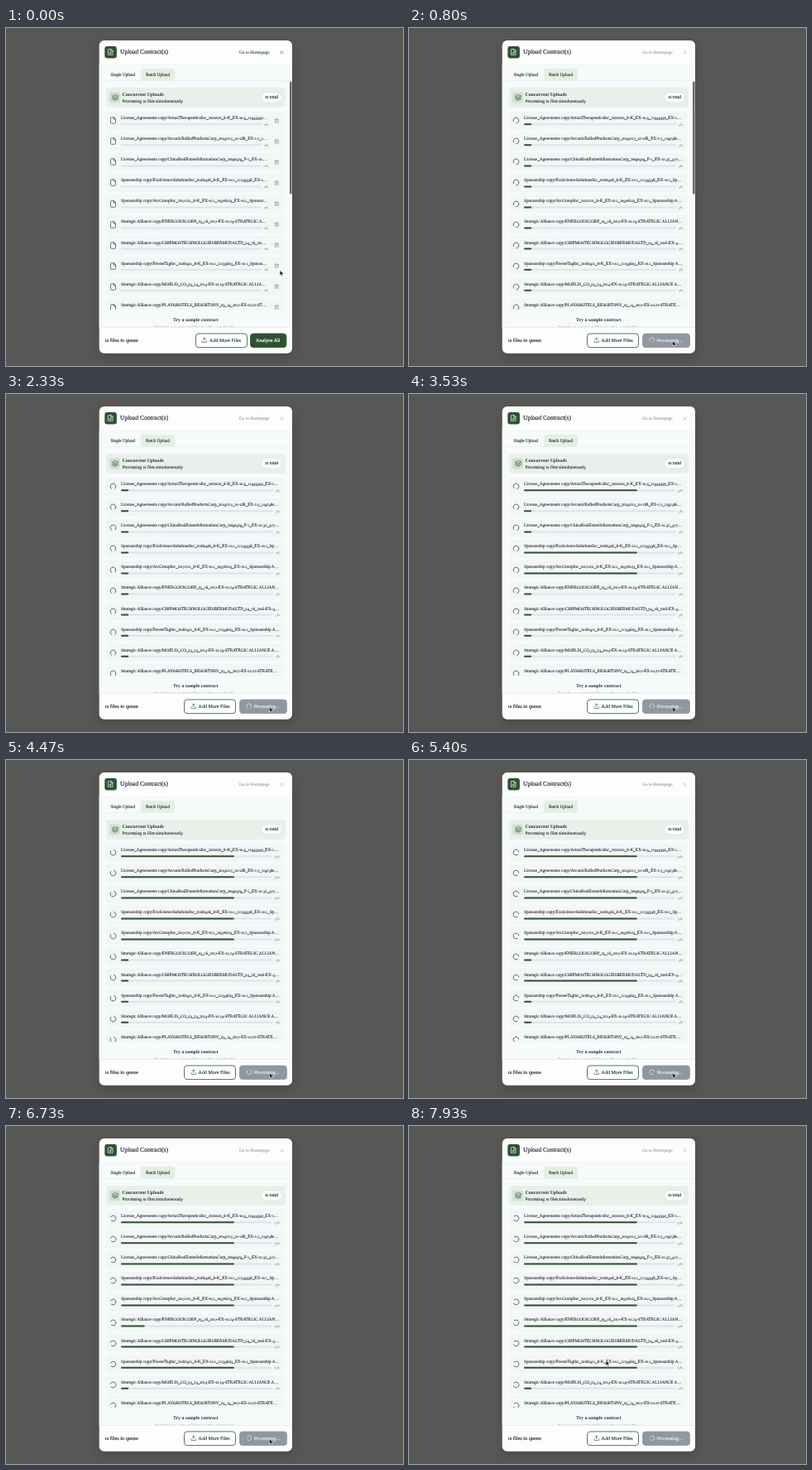
Animation of 480 by 408 pixels, one loop 8 s. Source, as an HTML page:

```html
<!DOCTYPE html>
<html lang="en">
<head>
<meta charset="utf-8">
<title>Upload contracts</title>
<style>
html, body { margin: 0; width: 100%; height: 100%; overflow: hidden; background: #575755; }
#stage { position: relative; width: 480px; height: 408px; overflow: hidden; background: #575755;
  font-family: "Liberation Serif", "Times New Roman", serif; text-rendering: geometricPrecision; }
#stage div, #stage svg { position: absolute; }
.text { white-space: nowrap; height: 10px; line-height: 10px; }
.medium { -webkit-text-stroke: .18px currentColor; }
.bold { font-weight: bold; }
/* old-style figures */
small, sub { line-height: 0; }
small { font-size: .75em; }
sub { font-size: .95em; vertical-align: -.16em; }
.icon { fill: none; stroke: currentColor; stroke-width: 2; stroke-linecap: round; stroke-linejoin: round; }
#shadow { left: 113px; top: 15px; width: 233px; height: 377px; border-radius: 6px; box-shadow: 0 5px 12px rgba(0,0,0,.16); }
#list { left: 112px; top: 98px; width: 230px; height: 242px; overflow: hidden; }
#hint { left: 112px; top: 341px; width: 230px; height: 20px; overflow: hidden; }
.name { left: 27px; font-size: 5.2px; overflow: hidden; text-overflow: ellipsis; color: #20282b;
  -webkit-text-stroke: .1px currentColor; }
.percent { width: 20px; font-size: 3.9px; text-align: right; color: #4a5458; }
</style>
</head>
<body>
<div id="stage"></div>
<script>
const LOOP = 8000, CLICK = 600, SPIN = 392;
const GREEN = '#2f5233';
const stage = document.getElementById('stage');

const ICONS = {
  file: '<path d="M14 2H6a2 2 0 0 0-2 2v16a2 2 0 0 0 2 2h12a2 2 0 0 0 2-2V8zM14 2v6h6"/>',
  plus: '<path d="M14 2H6a2 2 0 0 0-2 2v16a2 2 0 0 0 2 2h12a2 2 0 0 0 2-2V8zM14 2v6h6M12 11v7M8.5 14.5h7"/>',
  trash: '<path d="M3 6h18M19 6v14a2 2 0 0 1-2 2H7a2 2 0 0 1-2-2V6M8 6V4a2 2 0 0 1 2-2h4a2 2 0 0 1 2 2v2M10 11v6M14 11v6"/>',
  layers: '<path d="M12 2 2 7l10 5 10-5zM2 12l10 5 10-5M2 17l10 5 10-5"/>',
  upload: '<path d="M21 15v4a2 2 0 0 1-2 2H5a2 2 0 0 1-2-2v-4M17 8l-5-5-5 5M12 3v12"/>',
  close: '<path d="M18 6 6 18M6 6l12 12"/>',
  spinner: '<path d="M21 12a9 9 0 1 1-6.22-8.56"/>'
};

const oldStyle = string => string
  .replace(/[0-2]/g, '<small>$&</small>')
  .replace(/[34579]/g, '<sub>$&</sub>');

function add(parent, className, style = {}, content = '') {
  const el = document.createElement('div');
  el.className = className;
  el.innerHTML = content;
  for (const key in style) {
    const value = style[key];
    el.style[key] = typeof value === 'number' ? value + 'px' : value;
  }
  return parent.appendChild(el);
}

function svg(tag, parent, attributes) {
  const el = document.createElementNS('http://www.w3.org/2000/svg', tag);
  for (const key in attributes) el.setAttribute(key, attributes[key]);
  return parent.appendChild(el);
}

const canvas = parent => svg('svg', parent, { width: 480, height: 408 });
const rect = (parent, x, y, width, height, fill, rx = 0, stroke = 'none', strokeWidth = .8) =>
  svg('rect', parent, { x, y, width, height, fill, rx, stroke, 'stroke-width': strokeWidth });

const text = (string, left, y, fontSize, color, weight = '', parent = stage) =>
  add(parent, 'text ' + weight, { left, top: y - 5, fontSize, color }, oldStyle(string));

const icon = (name, x, y, size, color, parent = stage) =>
  add(parent, '', { left: x - size / 2, top: y - size / 2, width: size, height: size, color },
    `<svg class="icon" width="${size}" height="${size}" viewBox="0 0 24 24">${ICONS[name]}</svg>`);

add(stage, '').id = 'shadow';
const back = canvas(stage);
rect(back, 112.7, 15, 233.3, 377.7, '#fdfdfd', 6);
rect(back, 112.7, 44, 233.3, 317.5, '#f6fafb');
rect(back, 112.7, 43.7, 233.3, .5, '#e9edee');
rect(back, 112.7, 63.2, 233.3, .5, '#e1e7e8');
rect(back, 112.7, 361.2, 233.3, .6, '#e2e6e8');
rect(back, 119.3, 22, 14.6, 14.6, GREEN, 3);
rect(back, 163, 49, 41, 14.4, '#e4eee5', 3);
rect(back, 121, 72, 217, 24, '#e8f0e9', 4);
rect(back, 125, 77.5, 13, 13, '#cfdfd1', 3);
rect(back, 308.6, 77.7, 24.8, 12.2, '#fdfefd', 6.1, '#cbdccd', .6);
const scrollbar = rect(back, 343, 64.5, 2.6, 136, '#686c6d', 1.3);

icon('plus', 126.6, 29.3, 8.4, '#fff');
text('Upload Contract(s)', 138, 29.3, 7.55, '#22303a', 'medium');
const home = text('Go to Homepage', 282, 30.1, 5.35, '#3f6a42', 'medium');
const close = icon('close', 333, 29, 7, '#4d5659');
text('Single Upload', 126.5, 57.1, 5.15, '#3d474b', 'medium');
text('Batch Upload', 169, 57.1, 5.25, '#2b4a30', 'medium');
icon('layers', 131.5, 84, 8, GREEN);
text('Concurrent Uploads', 140.5, 81.2, 5.77, '#22303a', 'bold');
text('Processing 10 files simultaneously', 140.5, 88.5, 5.4, '#384347', 'medium');
text('10 total', 313, 83.8, 5.8, '#2b3a30', 'medium');

// name, time at which the row leaps to 75 % (null: stays at 5 %)
const FILES = [
  ['License_Agreements copy/ArtaraTherapeuticsInc_20200120_8-K_EX-10.5_11945350_EX-10.5_License', 2730],
  ['License_Agreements copy/ArconicRolledProductsCorp_20191217_10-12B_EX-2.7_11923804_EX-2.7', 3930],
  ['License_Agreements copy/ChinaRealEstateInformationCorp_20090929_F-1_EX-10.32_4771615_EX', 4330],
  ['Sponsorship copy/EcoScienceSolutionsInc_20180406_8-K_EX-10.1_11135398_EX-10.1_Sponsorship', 2930],
  ['Sponsorship copy/ArcGroupInc_20171211_8-K_EX-10.1_10976103_EX-10.1_Sponsorship Agreement', 3130],
  ['Strategic Alliance copy/ENERGOUSCORP_03_16_2017-EX-10.24-STRATEGIC ALLIANCE AGREEMENT', 6700],
  ['Strategic Alliance copy/CHIPMOSTECHNOLOGIESBERMUDALTD_04_18_2016-EX-4.72-Strategic', 4870],
  ['Sponsorship copy/FreezeTagInc_20180411_8-K_EX-10.1_11139603_EX-10.1_Sponsorship Agreement', 5930],
  ['Strategic Alliance copy/MOELIS_CO_03_24_2014-EX-10.19-STRATEGIC ALLIANCE AGREEMENT', null],
  ['Strategic Alliance copy/PLAYAHOTELS_RESORTSNV_03_14_2017-EX-10.22-STRATEGIC ALLIANCE', null]
];

const list = add(stage, '');
list.id = 'list';
const bars = canvas(list);
const rows = FILES.map(([label, leap], i) => {
  const top = 2.8 + i * 25.05;
  rect(bars, 9, top, 215, 22, '#f2f6f7', 3.5);
  return {
    leap,
    track: rect(bars, 27, top + 14.5, 0, 2, '#dde3e7', 1),
    fill: rect(bars, 27, top + 14.5, 0, 2, GREEN, 1),
    name: add(list, 'text name', { top: top + 3.4 }, oldStyle(label)),
    percent: add(list, 'text percent', { top: top + 11.2 }),
    file: icon('file', 17, top + 11, 9, '#434d51', list),
    trash: icon('trash', 214.8, top + 11, 6.6, '#868f93', list),
    spinner: icon('spinner', 17, top + 11, 9, GREEN, list)
  };
});

const hint = add(stage, '');
hint.id = 'hint';
text('Try a sample contract', 90, 11.6, 5.84, '#22303a', 'bold', hint);
text("Don't have a contract? Try it with a sample file.", 67.5, 21.3, 5.2, '#7f898d', '', hint);

text('10 files in queue', 119.5, 378.1, 6.3, '#2b3438', 'medium');

function button(width, fill, stroke, name, string, x, fontSize, color) {
  const el = add(stage, '', { top: 368 });
  const shape = canvas(el);
  rect(shape, .5, .9, width - 1, 16.7, fill, 3.5, stroke);
  text(string, x, 9.7, fontSize, color, 'medium', el);
  el.mark = name && icon(name, x - 6, 9.2, 7.5, color, el);
  return el;
}

const more = button(63, '#fdfefd', GREEN, 'upload', 'Add More Files', 17.6, 6, GREEN);
const analyze = button(44.4, GREEN, GREEN, null, 'Analyze All', 7, 6.15, '#fff');
const busy = button(58, '#8f98a1', '#8f98a1', 'spinner', 'Processing...', 18.2, 6.1, '#e9ecee');
analyze.style.left = '295px';
busy.style.left = '281.5px';

const cursor = add(stage, '', { left: 0, top: 0 },
  `<svg width="7" height="9" viewBox="-1 -1 14 18" style="left:-.5px;top:-.5px">
   <path d="M0 0v12.5l3-2.8 2 4.6 2.2-1-2-4.4h4.2z" fill="#111" stroke="#fff" stroke-width="1"/></svg>`);

// time, x, y of the pointer tip
const PATH = [[70, 330.6, 292], [330, 326, 398], [530, 318, 377.2], [7530, 318, 377.2], [7900, 237.5, 282.5], [LOOP, 237.5, 282.5]];

const clamp = v => Math.min(1, Math.max(0, v));
const ease = v => v * v * (3 - 2 * v);
const show = (el, on) => { el.style.visibility = on ? 'visible' : 'hidden'; };

function pointerAt(t) {
  const i = Math.max(1, PATH.findIndex(p => p[0] > t));
  const [a, b] = [PATH[i - 1], PATH[i]];
  const k = ease(clamp((t - a[0]) / (b[0] - a[0])));
  return [a[1] + (b[1] - a[1]) * k, a[2] + (b[2] - a[2]) * k];
}

function render(t) {
  const running = t >= CLICK;
  const spin = `rotate(${51 + (t - 1470) / SPIN * 360}deg)`;

  home.style.color = running ? '#a3aba4' : '#3f6a42';
  close.style.opacity = running ? .5 : 1;
  scrollbar.style.opacity = 1 - clamp((t - 930) / 270);
  more.style.left = (running ? 215 : 228.5) + 'px';
  show(analyze, !running);
  show(busy, running);
  busy.mark.style.transform = spin;

  for (const row of rows) {
    const leapt = row.leap !== null && t >= row.leap;
    const value = leapt ? 75 : running ? 5 : 0;
    const filled = leapt ? 5 + 70 * ease(clamp((t - row.leap) / 125)) : 5 * clamp((t - CLICK) / 125);
    const length = running ? (leapt ? 182.5 : 184) : 170;
    row.name.style.width = (running ? 192 : 178) + 'px';
    row.track.setAttribute('width', length);
    row.fill.setAttribute('width', length * filled / 100);
    row.percent.innerHTML = oldStyle(value + '%');
    row.percent.style.left = (running ? 199 : 185) + 'px';
    show(row.file, !running);
    show(row.trash, !running);
    show(row.spinner, running);
    row.spinner.style.transform = spin;
  }

  const [x, y] = pointerAt(t);
  cursor.style.transform = `translate(${x}px, ${y}px)`;
}

const start = performance.now();
function tick() {
  render((performance.now() - start) % LOOP);
  requestAnimationFrame(tick);
}
render(0);
requestAnimationFrame(tick);
</script>
</body>
</html>
```
